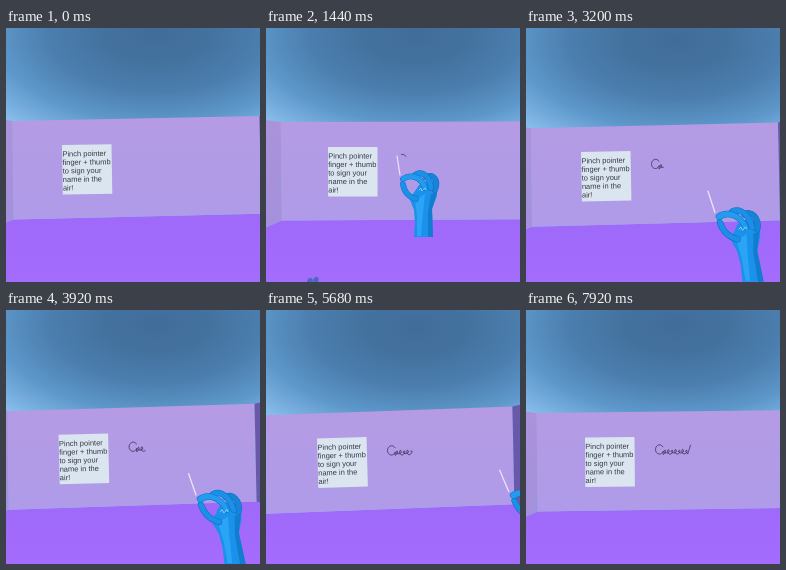
Animation, 254 px wide and 254 px high, one loop 8000 ms. Source, as an HTML page with a canvas:

```html
<!DOCTYPE html>
<html lang="en">
<head>
<meta charset="utf-8">
<title>Sign in the air</title>
<style>
html, body { margin: 0; width: 100%; height: 100%; overflow: hidden; background: #4a80b5; }
canvas { display: block; width: 100vw; height: 100vh; }
</style>
</head>
<body>
<canvas id="stage"></canvas>
<script>
const SIZE = 254, LOOP = 8000, STEP = 80;
const canvas = document.getElementById('stage');
const ctx = canvas.getContext('2d');

// Where the note hangs as the head turns: time, x, y
const GAZE = [
  [0, 56, 117], [1440, 62, 119], [3200, 55, 124], [4560, 51, 125.5],
  [5680, 51, 128.5], [6960, 52.5, 132], [7920, 59, 127.5]
];
const NOTE = ['Pinch pointer', 'finger + thumb', 'to sign your', 'name in the', 'air!'];

// Eased progress from 0 to 1 between two times
function ramp(t, from, to) {
  const k = Math.min(1, Math.max(0, (t - from) / (to - from)));
  return k * k * (3 - 2 * k);
}

// Smooth curve through unevenly timed keys
function glide(keys, t) {
  let i = 0;
  while (i < keys.length - 2 && t >= keys[i + 1][0]) i++;
  const a = keys[i], b = keys[i + 1], span = b[0] - a[0];
  const p = keys[Math.max(0, i - 1)], n = keys[Math.min(keys.length - 1, i + 2)];
  const k = (t - a[0]) / span, k2 = k * k, k3 = k2 * k;
  return [1, 2].map(c => {
    const m0 = (b[c] - p[c]) / (b[0] - p[0]) * span;
    const m1 = (n[c] - a[c]) / (n[0] - a[0]) * span;
    return (2 * k3 - 3 * k2 + 1) * a[c] + (k3 - 2 * k2 + k) * m0 +
           (3 * k2 - 2 * k3) * b[c] + (k3 - k2) * m1;
  });
}

// Walls and tilt follow from the note's place
function lookAt(t) {
  const [x, y] = glide(GAZE, t);
  const turn = x - 55;
  const slope = -.023 + .003 * turn;
  const left = 5 + 1.4 * turn, right = left + 247;
  const top = y - 25 - slope * 50;
  const drop = slope * 247;
  return {
    x, y, slope, left, right,
    leftTop: top, leftBottom: top + 98.5,
    rightTop: top + drop, rightBottom: top + drop + 97.7
  };
}

function shade(g, colors) {
  colors.forEach((c, i) => g.addColorStop(i / (colors.length - 1), c));
  return g;
}

const fade = (y0, y1, ...colors) => shade(ctx.createLinearGradient(0, y0, 0, y1), colors);

function trace(points) {
  ctx.beginPath();
  points.forEach(([x, y]) => ctx.lineTo(x, y));
}

function fill(color, ...points) {
  trace(points);
  ctx.fillStyle = color;
  ctx.fill();
}

function line(color, width, points) {
  trace(points);
  ctx.strokeStyle = color;
  ctx.lineWidth = width;
  ctx.stroke();
}

function drawSky(horizon) {
  ctx.save();
  ctx.translate(150, horizon - 88);
  ctx.scale(1.8, 1);
  ctx.fillStyle = shade(ctx.createRadialGradient(0, 0, 0, 0, 0, 118),
    ['#406c9a', '#44729f', '#4b7eae', '#5d97ca', '#86bbea']);
  ctx.fillRect(-SIZE, -SIZE, 2 * SIZE, 2 * SIZE);
  ctx.restore();
}

function drawRoom({ left, right, leftTop, leftBottom, rightTop, rightBottom }) {
  drawSky(leftTop);
  const edge = -2, depth = left - edge;
  fill(fade(leftBottom, SIZE, '#9f69f9', '#a46cfc'),
    [edge, leftBottom + depth * .45], [left + 1, leftBottom], [right + 2, rightBottom],
    [right + 40, rightBottom + 14], [right + 40, SIZE], [edge, SIZE]);
  fill(fade(leftTop, leftBottom, '#b49be4', '#af9be9'),
    [left, leftTop], [right, rightTop], [right + 2, rightBottom], [left + 1, leftBottom]);
  if (depth > 0) {
    fill(fade(leftTop, leftBottom, '#ab93da', '#a490dc'),
      [edge, leftTop - depth * .15], [left, leftTop],
      [left + 1, leftBottom], [edge, leftBottom + depth * .45]);
  }
  fill('#6959ab',
    [right, rightTop], [right + 20, rightTop - 5],
    [right + 22, rightBottom + 7], [right + 2, rightBottom]);
}

function drawNote({ x, y, slope }) {
  ctx.save();
  ctx.transform(1, slope * .8, -slope * .8, 1, x, y);
  ctx.fillStyle = '#dbe5f0';
  ctx.fillRect(0, 0, 49.5, 49.5);
  ctx.fillStyle = '#343945';
  ctx.font = '7.5px "Liberation Sans", Arial, sans-serif';
  NOTE.forEach((s, i) => ctx.fillText(s, .2, 11.5 + i * 8.5));
  ctx.restore();
}

// A large open curve, a run of uneven loops and a closing upstroke
function inkPoint(u) {
  if (u < 9) {
    const a = -.6 - u * .6;
    return [4 + 4 * Math.cos(a), 5 + 4.6 * Math.sin(a)];
  }
  if (u < 33) {
    const a = (u - 9) * 1.75;
    return [u - 1.5 + 1.6 * Math.sin(a), 7.4 + (1.8 + .7 * Math.sin(u * .9)) * Math.cos(a)];
  }
  const k = (u - 33) / 3;
  return [32 + k * 3, 10.5 - k * 9.5];
}

function drawInk({ x, y, slope }, t) {
  if (t < 1300) return;
  const end = 36 * ((t - 1200) / 6720) ** .85;
  const points = [];
  for (let u = 0; u <= end; u += .2) points.push(inkPoint(u));
  ctx.save();
  ctx.transform(1, slope * .8, 0, 1, x + 70.5, y + 7);
  line('#2a1c3e', .7, points);
  ctx.restore();
}

function finger(color, from, bend1, bend2, tip) {
  [['#1170bd', 5.8], [color, 4.8]].forEach(([c, w]) => {
    ctx.beginPath();
    ctx.moveTo(...from);
    ctx.bezierCurveTo(...bend1, ...bend2, ...tip);
    ctx.strokeStyle = c;
    ctx.lineWidth = w;
    ctx.stroke();
  });
}

// Rises to the wall, settles low on the right, then leaves sideways
function drawHand(t) {
  const rise = ramp(t, 500, 1300), lower = ramp(t, 2250, 2850);
  const drift = ramp(t, 3200, 4560), leave = ramp(t, 5200, 5980);
  if (rise === 0 || leave === 1) return;
  const scale = 1 + .12 * lower;
  const lean = .17 * lower + .03 * drift + .1 * leave;
  ctx.save();
  ctx.translate(168 - 33 * rise + 56 * lower + 2 * drift + 78 * leave,
    285 - 133 * rise + 38 * lower + drift - 6 * leave);
  ctx.transform(scale, 0, lean * scale, scale, 0, 0);
  line('#ece4fa', 1.2, [[-4, -24], [-1, -5]]);
  fill('#1a92ec', [12, 14], [18, 5], [28, 0], [36, 4], [36, 16], [31, 29],
    [32, 57], [13, 57], [14, 42], [13, 30], [9, 20]);
  fill('#127ccf', [30, 14], [36, 12], [31, 29], [32, 57], [27, 57], [27, 32]);
  fill('#2ba4f6', [14, 20], [24, 14], [22, 32], [20, 56], [16, 56], [16, 36]);
  finger('#1784da', [34, 10], [38, 0], [32, -7], [25, -3]);
  finger('#1a90e8', [30, 8], [28, -8], [18, -9], [13, -4]);
  finger('#229cf0', [24, 8], [20, -4], [9, -6], [2, -1]);
  finger('#1a90e8', [15, 19], [8, 17], [3, 12], [2, 4]);
  line('#8fd2fa', .8, [[18, 10], [20, 8], [21, 11], [24, 8], [25, 10]]);
  ctx.restore();
}

function drawFingertips(t) {
  const y = 264 - 11 * (ramp(t, 1120, 1440) - ramp(t, 1440, 1760));
  ctx.fillStyle = '#4c68c4';
  for (let i = 0; i < 2; i++) {
    ctx.beginPath();
    ctx.ellipse(44 + 6 * i, y - i, 2.6, 3.2, .5, 0, 7);
    ctx.fill();
  }
}

function draw(t) {
  const view = lookAt(t);
  drawRoom(view);
  drawNote(view);
  drawInk(view, t);
  drawFingertips(t);
  drawHand(t);
}

function fit() {
  const ratio = window.devicePixelRatio || 1;
  const w = Math.round(innerWidth * ratio), h = Math.round(innerHeight * ratio);
  if (canvas.width !== w || canvas.height !== h) {
    canvas.width = w;
    canvas.height = h;
  }
  ctx.setTransform(w / SIZE, 0, 0, h / SIZE, 0, 0);
  ctx.lineCap = ctx.lineJoin = 'round';
}

const start = performance.now();
function tick() {
  const t = (performance.now() - start) % LOOP;
  fit();
  draw(Math.floor(t / STEP) * STEP);
  requestAnimationFrame(tick);
}
tick();
</script>
</body>
</html>
```
